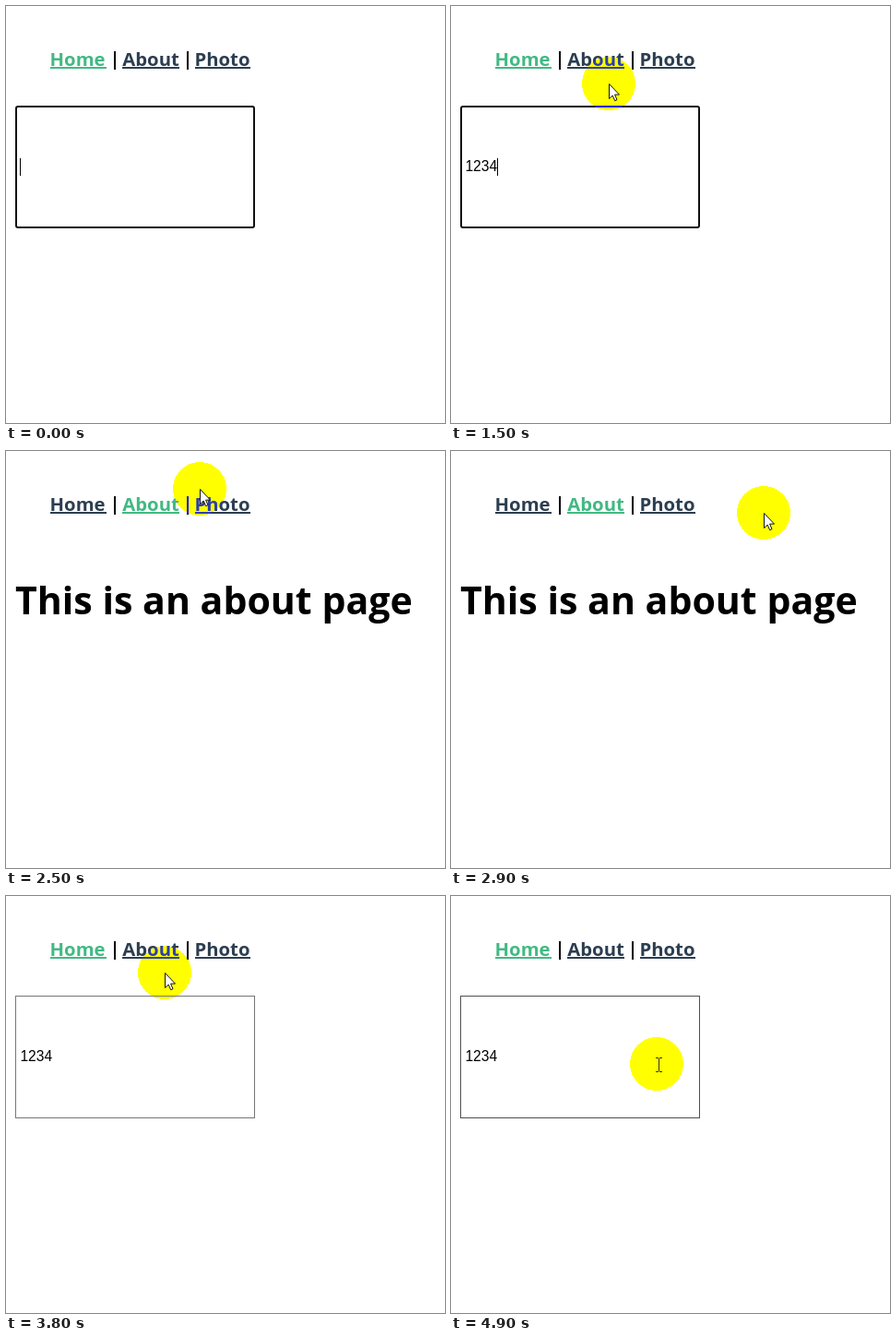
Write an HTML page that moves like this. It is 476x452 px and loops after 5400 ms.

```html
<!DOCTYPE html>
<html lang="en">
<head>
<meta charset="utf-8">
<title>Router demo</title>
<style>
  html, body { margin: 0; width: 100%; height: 100%; overflow: hidden; background: #fff; }
  svg { display: block; width: 476px; height: 452px; isolation: isolate; }
  .link, #heading { font-family: "Open Sans", "Noto Sans", sans-serif; font-weight: 700; }
  .link { font-size: 20.3px; fill: #2c3e50; }
  .link.active { fill: #42b983; }
  #heading { font-size: 41.1px; }
  #value { font: 15.6px "Liberation Sans", Arial, sans-serif; }
  .crisp { shape-rendering: crispEdges; }
  #field { fill: none; stroke: #767676; }
  #field.hover { stroke: #4f4f4f; }
  #focusRing { fill: none; stroke: #101010; stroke-width: 2; }
  #halo { fill: #00f; mix-blend-mode: difference; }
  .solid { fill: #fff; stroke: #111; stroke-linejoin: round; }
</style>
</head>
<body>
<svg viewBox="0 0 476 452">
  <rect width="476" height="452" fill="#fff"/>

  <g id="homeLink" class="link">
    <text x="47.6" y="65">Home</text><rect class="crisp" x="48" y="66" width="61" height="2"/>
  </g>
  <g id="aboutLink" class="link">
    <text x="126.3" y="65">About</text><rect class="crisp" x="126" y="66" width="62" height="2"/>
  </g>
  <g id="photoLink" class="link">
    <text x="204.5" y="65">Photo</text><rect class="crisp" x="205" y="66" width="60" height="2"/>
  </g>
  <path class="crisp" d="M117 49h2v20h-2zM196 49h2v20h-2z"/>

  <g id="homePage">
    <rect id="field" class="crisp" x="10.5" y="108.5" width="259" height="132"/>
    <rect id="focusRing" x="11" y="109" width="258" height="131" rx="2"/>
    <text id="value" x="15.4" y="179"></text>
    <rect id="caret" class="crisp" y="165" width="1" height="19"/>
  </g>
  <text id="heading" x="10" y="177">This is an about page</text>

  <circle id="halo" class="crisp" r="29"/>
  <g id="pointer">
    <path id="arrow" class="solid" d="M.5.5V16.5L4.2 13.1L6.7 18.7L9 17.7L6.6 12.1H11.5Z"/>
    <path id="hand" class="solid" transform="translate(0 1)" d="M-.8 14V2Q-.8.4.7.4T2.3 2V8.5Q2.3 6.9 3.9 6.9T5.5 8.6Q5.6 7.4 7 7.4T8.5 9.2Q8.7 8.2 10 8.3T11.4 10V16Q11.4 19 9.3 21V24H1V21.2L-4.4 14.5Q-5.4 12.8-4 12T-.8 14ZM2.3 8.5V13M5.5 8.6V13M8.5 9.2V13"/>
    <path id="beam" class="crisp" fill="#333" d="M-1-7h3v1h-3zM3-7h3v1h-3zM2-6h1v14h-1zM-1 8h3v1h-3zM3 8h3v1h-3z"/>
  </g>
</svg>
<script>
const LOOP = 5400, STEP = 100;
const BLUR = 23, TO_ABOUT = 24, TO_HOME = 37;
const KEY_GAP = 3, BLINK = 5, DIGIT = 8.67, TEXT = "1234";
const el = id => document.getElementById(id);
const show = (id, on) => { el(id).style.visibility = on ? "" : "hidden"; };

// Each pointer move is a quadratic curve, timed in steps
const origin = [123, 178];
const moves = [
  { start: 11, end: 18, bend: [184, 71], to: [178, 50] },
  { start: 24, end: 29, bend: [258, 20], to: [339, 67] },
  { start: 29, end: 33, bend: [225, 70], to: [77, 55] },
  { start: 37, end: 43, bend: [394, 145], to: [314, 179] },
  { start: 43, end: 48, bend: [223, 185], to: [223, 182] }
];

function pointerAt(step) {
  let from = origin;
  for (const { start, end, bend, to } of moves) {
    if (step <= start) break;
    const u = Math.min(1, (step - start) / (end - start)), v = 1 - u;
    from = from.map((p, i) => v * v * p + 2 * u * v * bend[i] + u * u * to[i]);
  }
  return from.map(Math.round);
}

function isOver(id, x, y) {
  const box = el(id).getBBox();
  return x >= box.x && x < box.x + box.width && y >= box.y && y < box.y + box.height;
}

function renderField(step, focused) {
  const lastKey = step > KEY_GAP
    ? Math.min(TEXT.length, Math.floor(step / KEY_GAP)) : 0;
  const sinceKey = step - lastKey * KEY_GAP;
  show("field", !focused);
  show("focusRing", focused);
  el("value").textContent = TEXT.slice(0, lastKey);
  el("caret").setAttribute("x", Math.round(15 + DIGIT * lastKey));
  show("caret", focused && sinceKey % (2 * BLINK) < BLINK);
}

function renderPointer(step, about) {
  const [x, y] = pointerAt(step);
  const visible = step > 0;
  const overField = visible && !about && isOver("field", x, y);
  const overLink = ["homeLink", "aboutLink", "photoLink"].some(id => isOver(id, x, y));
  for (const id of ["halo", "pointer"]) {
    el(id).setAttribute("transform", `translate(${x} ${y})`);
    show(id, visible);
  }
  el("field").classList.toggle("hover", overField);
  show("beam", overField);
  show("hand", overLink);
  show("arrow", visible && !overField && !overLink);
}

function render(step) {
  const about = step >= TO_ABOUT && step < TO_HOME;
  el("homeLink").classList.toggle("active", !about);
  el("aboutLink").classList.toggle("active", about);
  show("homePage", !about);
  show("heading", about);
  renderField(step, step < BLUR);
  renderPointer(step, about);
}

let last = -1;
function tick() {
  const step = Math.floor(performance.now() % LOOP / STEP);
  if (step !== last) render(last = step);
  requestAnimationFrame(tick);
}
tick();
</script>
</body>
</html>
```
